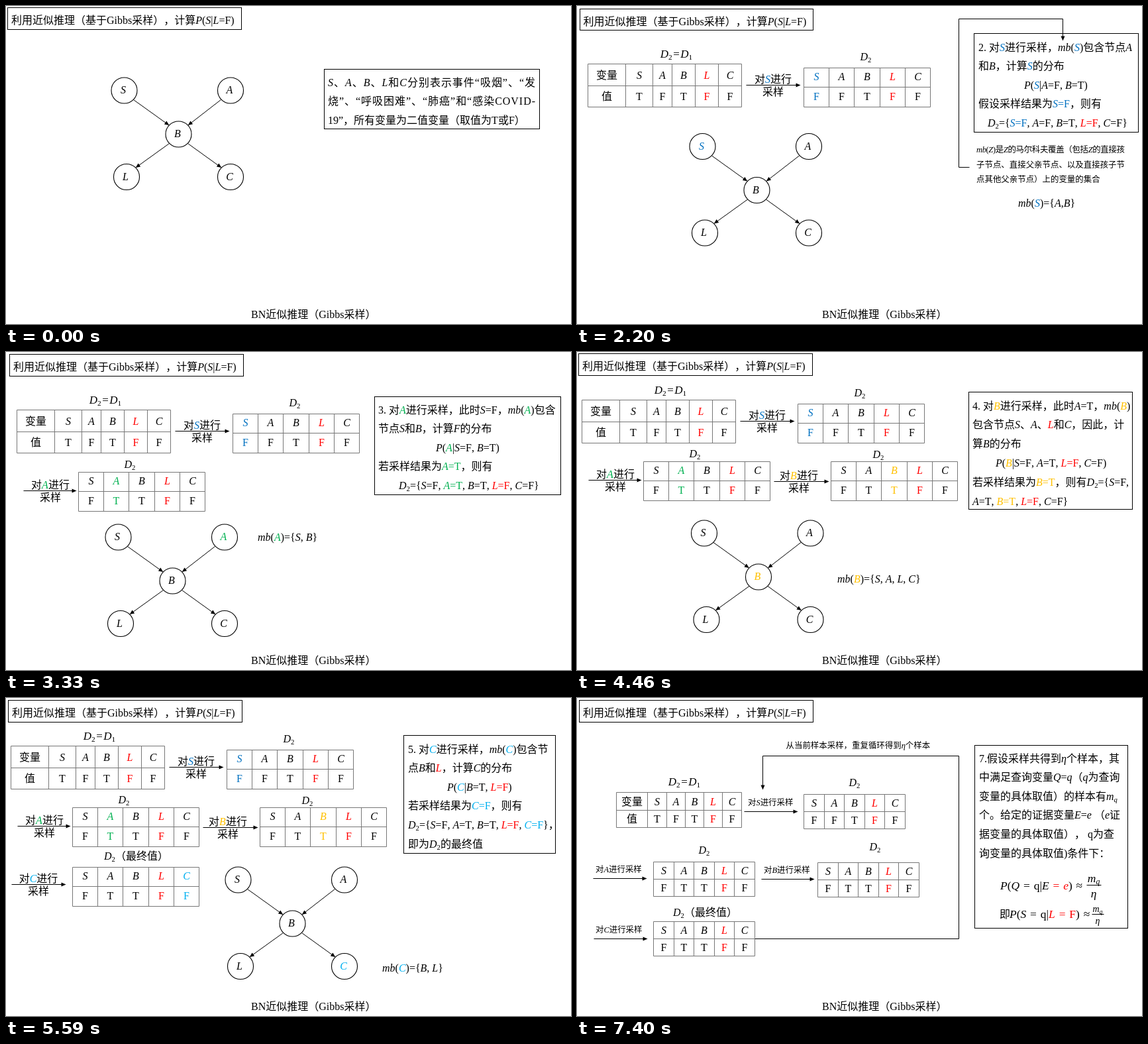
Recreate the animation shown at these times as an HTML page with a canvas. Size 853 by 480 pixels, loop 7.85 s.

```html
<!DOCTYPE html>
<html lang="zh-CN">
<head>
<meta charset="utf-8">
<title>BN近似推理</title>
<style>
html, body { margin: 0; width: 100%; height: 100%; overflow: hidden; background: #fff; }
canvas { display: block; width: 853px; height: 480px; }
</style>
</head>
<body>
<canvas id="stage" width="853" height="480"></canvas>
<script>
const ctx = document.getElementById('stage').getContext('2d');
ctx.fontKerning = 'none';
const FAMILY = '"Liberation Serif", "Noto Sans CJK SC", "Noto Sans CJK JP", serif';
const COLORS = { k: '#000', r: '#f00', b: '#0070c0', g: '#00b050', y: '#ffc000', c: '#00b0f0' };
const SMALL = 12.44;

// Markup: _ toggles italic, ~ toggles subscript, #x switches to colour x.
// Full-width punctuation becomes a run of its own, so it keeps its whole width.
function parse(markup, size) {
  let italic = false, sub = false, color = COLORS.k;
  const runs = [];
  for (const part of markup.split(/(#[krbgyc]|[_~，、（）：])/)) {
    if (part === '_') italic = !italic;
    else if (part === '~') sub = !sub;
    else if (part[0] === '#') color = COLORS[part[1]];
    else if (part) {
      const font = `${italic ? 'italic ' : ''}${sub ? size * 0.667 : size}px ${FAMILY}`;
      ctx.font = font;
      runs.push({ part, font, color, drop: sub ? size * 0.2 : 0, width: ctx.measureText(part).width });
    }
  }
  return runs;
}

// y is the middle of the line; a justify width spreads the letters evenly.
function text(markup, x, y, { size = 16, center = false, justify = 0 } = {}) {
  const runs = parse(markup, size);
  const total = runs.reduce((sum, run) => sum + run.width, 0);
  const letters = runs.reduce((sum, run) => sum + run.part.length, 0);
  const gap = justify ? (justify - total) / (letters - 1) : 0;
  if (center) x -= total / 2;
  ctx.letterSpacing = gap + 'px';
  for (const run of runs) {
    ctx.font = run.font;
    ctx.fillStyle = run.color;
    ctx.fillText(run.part, x, y + size * 0.35 + run.drop);
    x += run.width + gap * run.part.length;
  }
  ctx.letterSpacing = '0px';
}

const label = (markup, x, y, size) => text(markup, x, y, { size, center: true });

function paragraph(x, y, lines, step = 28.6) {
  lines.forEach((line, i) => {
    const [left, markup] = Array.isArray(line) ? line : [x, line];
    text(markup, left, y + i * step);
  });
}

function path(points, color = '#000') {
  ctx.strokeStyle = color;
  ctx.lineWidth = 1;
  ctx.beginPath();
  points.forEach(([x, y]) => ctx.lineTo(x + 0.5, y + 0.5));
  ctx.stroke();
}

function arrow(...points) {
  path(points);
  const [[x0, y0], [x1, y1]] = points.slice(-2);
  ctx.save();
  ctx.translate(x1 + 0.5, y1 + 0.5);
  ctx.rotate(Math.atan2(y1 - y0, x1 - x0));
  ctx.fillStyle = '#000';
  ctx.beginPath();
  ctx.moveTo(1, 0);
  ctx.lineTo(-6, -3);
  ctx.lineTo(-6, 3);
  ctx.fill();
  ctx.restore();
}

function box(...edges) {
  const [left, top, right, bottom] = edges.map(Math.round);
  ctx.strokeStyle = '#000';
  ctx.lineWidth = 1;
  ctx.strokeRect(left + 0.5, top + 0.5, right - left, bottom - top);
}

function title(x, y) {
  box(x, y, x + 352.6, y + 32.6);
  text('利用近似推理（基于Gibbs采样），计算_P_(_S_|_L_=F)', x + 6, y + 19.5);
}

function graph(x, y, marked = {}) {
  const nodes = { S: [-82, -66], A: [78.5, -66], B: [0, 0], L: [-78.5, 64.5], C: [78.5, 64.5] };
  for (const [name, [dx, dy]] of Object.entries(nodes)) {
    ctx.strokeStyle = '#000';
    ctx.lineWidth = 1.1;
    ctx.beginPath();
    ctx.arc(x + dx + 0.5, y + dy + 0.5, 19.5, 0, 7);
    ctx.stroke();
    label(`#${marked[name] || 'k'}_${name}_`, x + dx - 1, y + dy - 0.5);
  }
  arrow([x - 68, y - 52], [x - 15, y - 14]);
  arrow([x + 64, y - 52], [x + 15, y - 14]);
  arrow([x - 14, y + 14], [x - 64, y + 50]);
  arrow([x + 14, y + 14], [x + 64, y + 50]);
}

// An extra leading column holds the row names.
function table(xs, ys, values, marked, dy = 0) {
  const names = xs.length > 6 ? 1 : 0;
  for (const x of xs) path([[x, ys[0]], [x, ys[2]]], '#777');
  for (const y of ys) path([[xs[0], y], [xs.at(-1), y]], '#777');
  const cell = (markup, col, row) =>
    label(markup, (xs[col] + xs[col + 1]) / 2 + 0.5, (ys[row] + ys[row + 1]) / 2 + dy);
  if (names) {
    cell('变量', 0, 0);
    cell('值', 0, 1);
  }
  [...'SABLC'].forEach((name, i) => {
    const color = '#' + (marked[name] || 'k');
    cell(`${color}_${name}_`, i + names, 0);
    cell(color + values[i], i + names, 1);
  });
}

const columns = (x, width) => Array.from({ length: 6 }, (_, i) => Math.round(x + i * width));
const sampleTable = (x, y, values, marked) =>
  table(columns(x, 38.2), [y, y + 29, y + 59], values, { L: 'r', ...marked }, -1);
const smallTable = (x, y, values) =>
  table(columns(x, 30.6), [y, y + 26, y + 52], values, { L: 'r' });

function step(x1, x2, y, name, middle) {
  arrow([x1, y], [x2, y]);
  label(`对${name}进行`, middle, y - 9);
  label('采样', middle, y + 10.5);
}

function smallStep(x1, x2, y, name, left) {
  arrow([x1, y], [x2, y]);
  text(`对_${name}_进行采样`, left, y - 13, { size: SMALL });
}

const D2 = '_D_~2~';
const startLabel = (x, y) => label('_D_~2~\u200a=\u200a_D_~1~', x, y, 17);

function firstRow(x, y) {
  startLabel(x + 134, y - 15);
  table([0, 57, 98, 127, 162, 197, 232].map(dx => x + dx), [y, y + 33, y + 65], 'TFTFF', { L: 'r' }, 0.5);
  step(x + 239, x + 320, y + 32, '#b_S_#k', x + 280);
  label(D2, x + 420, y - 11);
  sampleTable(x + 326, y + 6, 'FFTFF', { S: 'b' });
}

function secondRow(x, y) {
  label(D2, x + 78, y - 12);
  step(x - 83, x - 4, y + 28, '#g_A_#k', x - 42);
  sampleTable(x, y, 'FTTFF', { A: 'g' });
}

function upToB() {
  firstRow(7, 72);
  secondRow(100, 165);
  label(D2, 455, 154);
  step(297, 379, 195, '#y_B_#k', 335);
  sampleTable(383, 165, 'FTTFF', { B: 'y' });
}

function fraction(left, right, y, size) {
  const middle = (left + right) / 2;
  path([[left, y], [right, y]]);
  label('_m_~_q_~', middle, y - size * 0.58, size);
  label('_η_', middle, y + size * 0.72, size);
}

const scenes = [
  () => {
    title(2, 2);
    graph(260, 193);
    box(480, 95, 805, 185);
    text('_S_、_A_、_B_、_L_和_C_分别表示事件“吸烟”、“发', 486, 115, { justify: 313 });
    text('烧”、“呼吸困难”、“肺癌”和“感染COVID-', 486, 143.5, { justify: 313 });
    text('19”，所有变量为二值变量（取值为T或F）', 486, 172);
  },
  () => {
    title(8.4, 6);
    label('_D_~1~', 42, 119);
    table([70, 160, 217, 271, 327, 382, 438], [92, 124, 155], 'TFTFF', { L: 'r' }, 1.5);
    graph(248, 267, { L: 'r' });
    box(465, 67, 840, 214);
    paragraph(471, 87, [
      '1. 首先随机生成一个与证据#r_L_=F#k一致的样本：',
      [548, '_D_~1~={_S_=T, _A_=F, _B_=T, #r_L_=F#k, _C_=F}'],
      '在由_D_~1~生成样本_D_~2~，从_D_~2~=_D_~1~={_S_=T, _A_=F, _B_=T, #r_L_=F#k,',
      '_C_=F}出发，对非证据变量逐个采样，设采样顺序为',
      '<_S_, _A_, _B_ , _C_>'
    ]);
  },
  () => {
    title(3.6, 3.6);
    firstRow(16, 87);
    graph(271, 277.5, { S: 'b' });
    box(599, 41, 847, 190);
    paragraph(606, 62, [
      '2. 对#b_S_#k进行采样，_mb_(#b_S_#k)包含节点_A_',
      '和_B_，计算#b_S_#k的分布',
      [675, '_P_(#b_S_#k|_A_=F, _B_=T)'],
      '假设采样结果为#b_S_=F#k，则有',
      [620, '_D_~2~={#b_S_=F#k, _A_=F, _B_=T, #r_L_=F#k, _C_=F}']
    ]);
    arrow([592, 243], [576, 243], [576, 19], [733, 19], [733, 51]);
    text('_mb_(_Z_)是_Z_的马尔科夫覆盖（包括_Z_的直接孩', 603, 217, { size: SMALL, justify: 224 });
    text('子节点、直接父亲节点、以及直接孩子节', 603, 239.5, { size: SMALL });
    text('点其他父亲节点）上的变量的集合', 603, 262, { size: SMALL });
    text('_mb_(#b_S_#k)={_A_,_B_}', 666, 297);
  },
  () => {
    title(5, 3);
    firstRow(16, 87);
    secondRow(109, 181);
    graph(251, 345, { A: 'g' });
    text('_mb_(#g_A_#k)={_S_, _B_}', 380, 279);
    box(556, 67, 837, 215);
    paragraph(562, 87, [
      '3. 对#g_A_#k进行采样，此时_S_=F，_mb_(#g_A_#k)包含',
      '节点_S_和_B_，计算_F_的分布',
      [649, '_P_(#g_A_#k|_S_=F, _B_=T)'],
      '若采样结果为#g_A_=T#k，则有',
      [593, '_D_~2~={_S_=F, #g_A_=T#k, _B_=T, #r_L_=F#k, _C_=F}']
    ]);
  },
  () => {
    title(2, 2);
    upToB();
    graph(273.5, 339, { B: 'y' });
    text('_mb_(#y_B_#k)={_S_, _A_, _L_, _C_}', 393, 342);
    box(591, 60, 838, 237);
    paragraph(597, 81, [
      '4. 对#y_B_#k进行采样，此时_A_=T，_mb_(#y_B_#k)',
      '包含节点_S_、_A_、#r_L_#k和_C_，因此，计',
      '算_B_的分布',
      [632, '_P_(#y_B_#k|_S_=F, _A_=T, #r_L_=F#k, _C_=F)'],
      '若采样结果为#y_B_=T#k，则有_D_~2~={_S_=F,',
      '_A_=T, #y_B_=T#k, #r_L_=F#k, _C_=F}'
    ], 28.8);
  },
  () => {
    title(3, 3);
    upToB();
    text('_D_~2~（最终值）', 148, 238);
    step(8, 89, 281, '#c_C_#k', 49);
    sampleTable(100, 255, 'FTTFF', { C: 'c' });
    graph(432, 340, { C: 'c' });
    text('_mb_(#c_C_#k)={_B_, _L_}', 568, 407);
    box(600, 56, 829, 234);
    paragraph(607, 77, [
      '5. 对#c_C_#k进行采样，_mb_(#c_C_#k)包含节',
      '点_B_和#r_L_#k，计算_C_的分布',
      [666, '_P_(#c_C_#k|_B_=T, #r_L_=F#k)'],
      '若采样结果为#c_C_=F#k，则有',
      '_D_~2~={_S_=F, _A_=T, _B_=T, #r_L_=F#k, #c_C_=F#k}，',
      '即为_D_~2~的最终值'
    ]);
  },
  () => {
    title(3, 3);
    text('从当前样本采样，重复循环得到_η_个样本', 315.5, 72, { size: SMALL });
    arrow([268, 363], [576, 363], [576, 87], [280, 87], [280, 137]);
    startLabel(162, 126);
    table([59, 106, 135, 163, 191, 219, 248], [142, 169, 195], 'TFTFF', { L: 'r' }, 0.5);
    smallStep(252, 332, 171, 'S', 258);
    label(D2, 419, 127);
    smallTable(342, 145, 'FFTFF');
    label(D2, 192, 229);
    smallStep(24, 104, 272, 'A', 28);
    smallTable(115, 247, 'FTTFF');
    label(D2, 450, 224);
    smallStep(278, 357, 273, 'B', 282);
    smallTable(363, 248, 'FTTFF');
    text('_D_~2~（最终值）', 145, 323);
    smallStep(25, 105, 363, 'C', 28);
    smallTable(115, 337, 'FTTFF');

    box(600, 71, 831, 347);
    paragraph(607, 91, [
      '7.假设采样共得到_η_个样本，其',
      '中满足查询变量_Q_=_q_（_q_为查询',
      '变量的具体取值）的样本有_m_~_q_~',
      '个。给定的证据变量_E_=_e_ （_e_证',
      '据变量的具体取值）， q为查',
      '询变量的具体取值)条件下：'
    ]);
    const formula = { size: 17.5 };
    text('_P_(_Q_\u2004=\u2004q|_E_#r\u2004=\u2004_e_#k)\u2004≈', 639, 283, formula);
    fraction(769, 791, 282, 17.5);
    text('即', 638, 326);
    text('_P_(_S_\u2004=\u2004q|#r_L_\u2004=\u2004F#k)\u2004≈', 653, 326, formula);
    fraction(777, 795, 326, 14);
  }
];

const FIRST = 1070, EACH = 1130, LOOP = 7850;
let shown = -1;

function draw(index) {
  ctx.fillStyle = '#fff';
  ctx.fillRect(0, 0, 853, 480);
  scenes[index]();
  text('BN近似推理（Gibbs采样）', 370, 465.5);
}

const begin = performance.now();
function tick() {
  const time = (performance.now() - begin) % LOOP;
  const index = time < FIRST ? 0 : 1 + Math.floor((time - FIRST) / EACH);
  if (index !== shown) draw(shown = index);
  requestAnimationFrame(tick);
}
tick();
</script>
</body>
</html>
```
